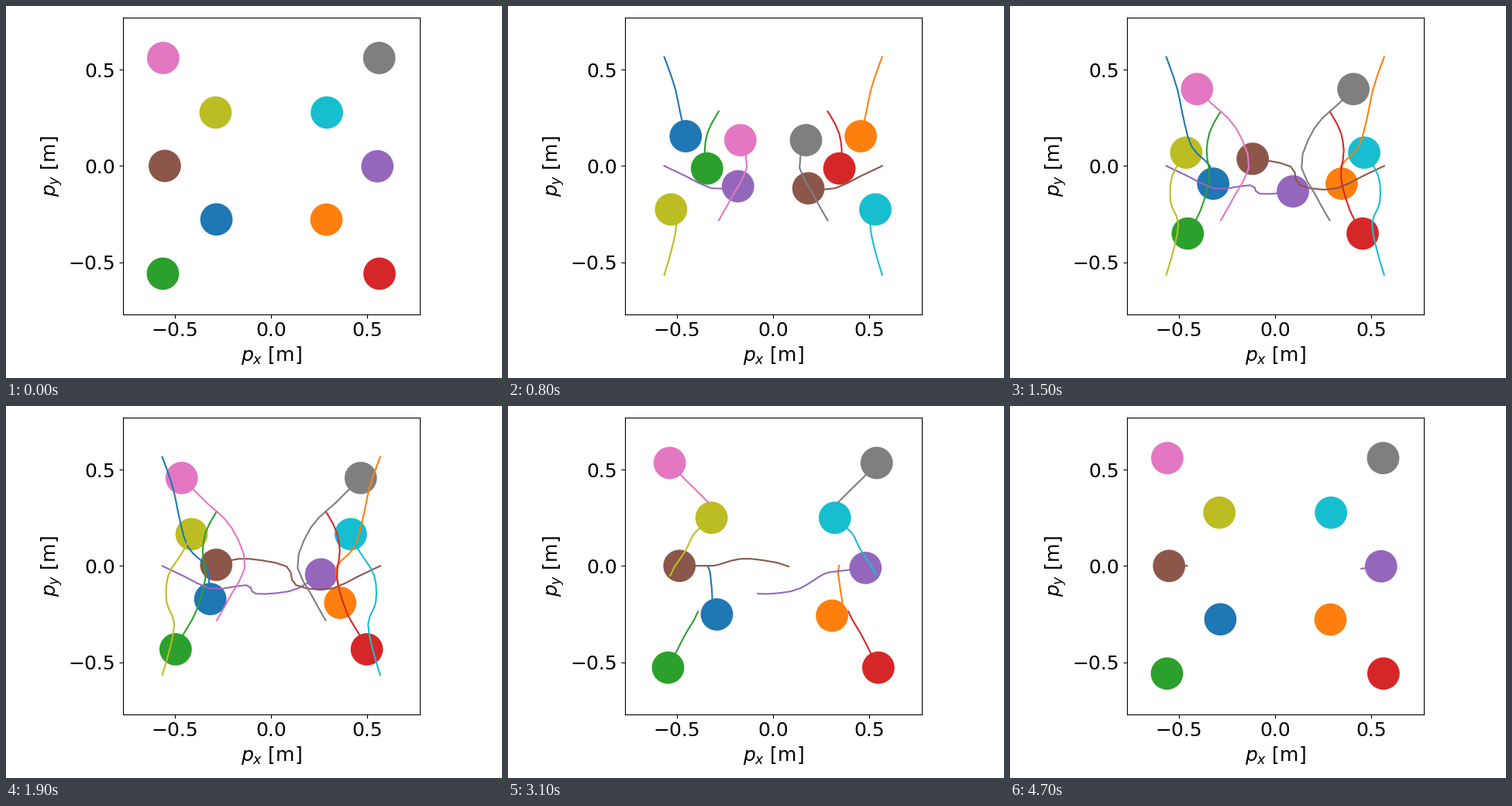
A matplotlib script for the animation above (4800 ms loop, 640 by 480 pixels).

```python
import numpy as np
import matplotlib.pyplot as plt
from matplotlib.animation import FuncAnimation
from matplotlib.patches import Circle

FRAMES, INTERVAL = 48, 100
TRAIL = 20                  # points kept in each trail
DECAY = 0.9                 # distance to the goal kept per settling step
CORNER = 0.4 * np.sqrt(2)   # formation half-width in metres
STEPS = np.array([1, 4, 6, 9, 12, 15, 20])
FLIP = np.array([-1, 1])


def hermite(points, slopes, t):
    """Smooth curve through the waypoints at the times t."""
    i = np.clip(np.searchsorted(STEPS, t, side="right") - 1, 0, len(STEPS) - 2)
    h = (STEPS[i + 1] - STEPS[i])[:, None]
    u = (t - STEPS[i])[:, None] / h
    return ((1 + 2 * u) * (1 - u) ** 2 * points[i]
            + u * (1 - u) ** 2 * h * slopes[i]
            + u * u * (3 - 2 * u) * points[i + 1]
            + u * u * (u - 1) * h * slopes[i + 1])


def travel(start, goal, via):
    """Start at rest, pass the waypoints, then settle on the goal."""
    start, goal = CORNER * np.array(start), CORNER * np.array(goal)
    points = np.vstack([start, via])
    slopes = np.gradient(points, STEPS, axis=0)
    slopes[0] = 0
    slopes[-1] = (points[-1] - goal) * np.log(DECAY)
    last = STEPS[-1]
    moving = hermite(points, slopes, np.arange(1, last + 1))
    rest = DECAY ** np.arange(1, FRAMES - last + 1)[:, None]
    return np.vstack([moving, goal + (points[-1] - goal) * rest])


def swerve(via, *ending):
    """Mirror the first half of a route and give it its own ending."""
    return np.vstack([(np.array(via) * FLIP)[:3], ending])


# Waypoints in metres for the left-hand robots.
down = [(-.507, .395), (-.483, .278), (-.434, .101),
        (-.340, .001), (-.322, -.092), (-.314, -.184)]
across = [(-.450, -.055), (-.322, -.116), (-.129, -.100),
          (-.080, -.144), (.092, -.132), (.290, -.033)]

blue = travel((-1, 1), (-.5, -.5), down)
orange = travel((1, 1), (.5, -.5), swerve(
    down, (.342, .001), (.345, -.092), (.354, -.204)))
purple = travel((-1, 0), (1, 0), across)
brown = travel((1, 0), (-1, 0), swerve(
    across, (.080, -.003), (-.117, .037), (-.314, .001)))
green = travel((-.5, .5), (-1, -1), [
    (-.342, .170), (-.356, .081), (-.342, -.064),
    (-.390, -.236), (-.454, -.351), (-.503, -.446)])
pink = travel((-.5, -.5), (-1, 1), [
    (-.205, -.144), (-.137, -.011), (-.205, .198),
    (-.334, .327), (-.406, .399), (-.475, .467)])
olive = travel((-1, -1), (-.5, .5), [
    (-.519, -.401), (-.503, -.301), (-.543, -.188),
    (-.535, -.051), (-.462, .069), (-.402, .178)])

paths = [blue, orange, green, green * FLIP, purple, brown,
         pink, pink * FLIP, olive, olive * FLIP]

plt.rcParams.update({"font.family": "DejaVu Sans", "font.size": 10})
fig, ax = plt.subplots(figsize=(6.4, 4.8), dpi=100)
ax.set_aspect("equal")
ax.set(xlim=(-.77, .77), ylim=(-.77, .77),
       xticks=[-.5, 0, .5], yticks=[-.5, 0, .5])
ax.set_xlabel("$p_x$ [m]", fontsize=18)
ax.set_ylabel("$p_y$ [m]", fontsize=18)
ax.tick_params(labelsize=18)
fig.tight_layout()

discs, trails = [], []
for i in range(len(paths)):
    discs.append(ax.add_patch(Circle((0, 0), 0.084, fc=f"C{i}", lw=0)))
    trails += ax.plot([], [], color=f"C{i}", lw=1.5)


def draw(frame):
    # The loop opens on the settled formation, without trails.
    now = (frame - 1) % FRAMES
    for path, disc, trail in zip(paths, discs, trails):
        disc.center = path[now]
        part = path[max(0, now + 1 - TRAIL):now + 1] if frame else path[:0]
        trail.set_data(part[:, 0], part[:, 1])
    return discs + trails


anim = FuncAnimation(fig, draw, frames=FRAMES, interval=INTERVAL,
                     init_func=lambda: draw(0), repeat=True, repeat_delay=0)
plt.show()
```
